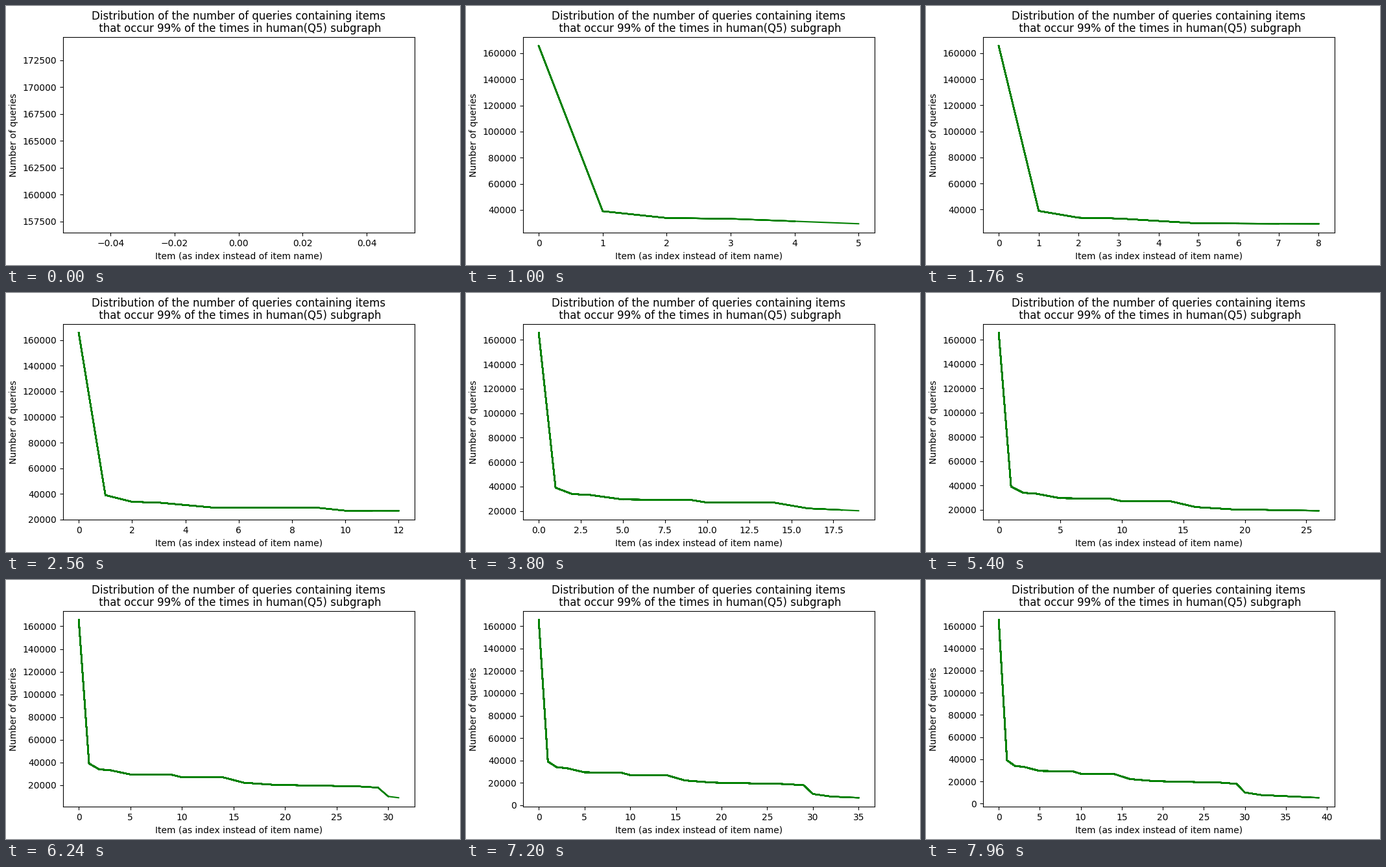
A matplotlib script that plays this animation: 700x400 px, repeating every 8 s.

```python
import numpy as np
import matplotlib.pyplot as plt
from matplotlib.animation import FuncAnimation
from matplotlib.collections import LineCollection

FRAMES = 200
INTERVAL = 40
ITEMS = 40
FRAMES_PER_ITEM = 5.02
HEAD_START = 0.45

# Corners of the curve; items between them lie on straight lines.
corners = {0: 165560, 1: 39000, 2: 33800, 3: 33200, 5: 29400, 9: 29100,
           10: 26900, 14: 26800, 16: 22100, 19: 20200, 27: 18900,
           29: 17800, 30: 10000, 32: 7700, 39: 5250}
items = np.arange(ITEMS)
counts = np.interp(items, list(corners), list(corners.values()))
curve = np.column_stack([items, counts])


def last_item(frame):
    return int((frame + HEAD_START) / FRAMES_PER_ITEM)


def padded(low, high):
    """Limits with a 5 % margin; a single value is widened first."""
    if low == high:
        spread = 0.05 * abs(low) or 0.05
        low, high = low - spread, high + spread
    margin = 0.05 * (high - low)
    return low - margin, high + margin


plt.rcParams.update({"font.family": "DejaVu Sans", "text.kerning_factor": 6})
fig, ax = plt.subplots(figsize=(7, 4), dpi=100)
fig.subplots_adjust(left=0.125, right=0.9, bottom=0.125, top=0.88)
ax.set_title("Distribution of the number of queries containing items\n"
             " that occur 99% of the times in human(Q5) subgraph",
             linespacing=1.08)
ax.set_xlabel("Item (as index instead of item name)")
ax.set_ylabel("Number of queries")

lines = LineCollection([], colors="green", linewidths=1.5,
                       capstyle="projecting", joinstyle="round")
ax.add_collection(lines, autolim=False)


def update(frame):
    # Every step plots the curve again on top, so its soft edges fill in.
    ends = [last_item(step) for step in range(frame + 1)]
    lines.set_segments([curve[:end + 1] for end in ends if end > 0])
    item = last_item(frame)
    ax.set_xlim(*padded(0, item))
    ax.set_ylim(*padded(counts[item], counts[0]))
    return [lines]


animation = FuncAnimation(fig, update, frames=FRAMES, interval=INTERVAL,
                          init_func=lambda: update(0), repeat=True)
plt.show()
```
